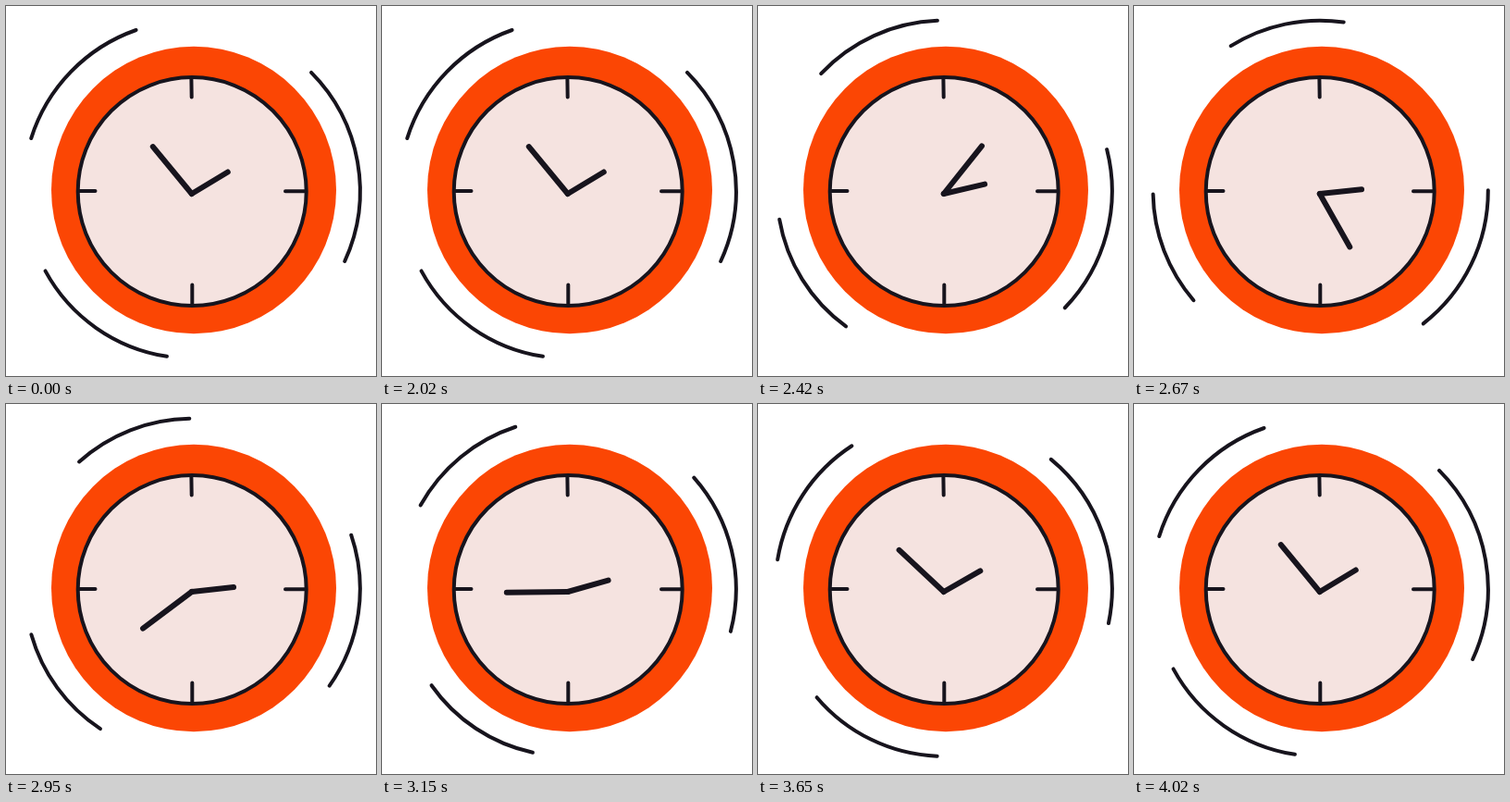
Recreate the animation shown at these times as an HTML page. Size 400 by 400 pixels, loop 4.05 s.

```html
<!DOCTYPE html>
<html lang="en">
<head>
<meta charset="utf-8">
<title>Clock</title>
<style>
html, body { margin: 0; width: 100%; height: 100%; overflow: hidden; background: #fff; }
svg { display: block; width: 100vw; height: 100vh; }
.ink { fill: none; stroke: #17141d; stroke-width: 4; stroke-linecap: round; stroke-linejoin: round; }
.hand { stroke-width: 6; }
</style>
</head>
<body>
<svg viewBox="0 0 400 400">
  <ellipse cx="203" cy="199" rx="154" ry="155.3" fill="#fb4604"/>
  <circle cx="201.2" cy="200.6" r="123.5" fill="#f5e3e0"/>
  <circle class="ink" cx="201.2" cy="200.6" r="123.5"/>
  <path class="ink" d="M200.4 79L200.7 98.5M201.3 301.5V322M79 200H96.5M302 200.2H323"/>
  <path class="ink hand" id="hour" d="M0 0V-45.5"/>
  <path class="ink hand" id="minute" d="M0 0V-66"/>
  <g id="arcs"></g>
</svg>
<script>
const LOOP = 4050, START = 2020, END = 4020, STEP = 25;

// Cubic bezier easing with end heights 0 and 1, solved by bisection.
function bezier(x1, x2) {
  return u => {
    let lo = 0, hi = 1;
    for (let i = 0; i < 30; i++) {
      const s = (lo + hi) / 2, r = 1 - s;
      if (3 * r * r * s * x1 + 3 * r * s * s * x2 + s * s * s < u) lo = s;
      else hi = s;
    }
    return lo * lo * (3 - 2 * lo);
  };
}

const sine = u => (1 - Math.cos(Math.PI * u)) / 2;

// keys: [time, value, easing towards this key]
function track(keys, t) {
  for (let i = 1; i < keys.length; i++) {
    const [t0, v0] = keys[i - 1], [t1, v1, ease = sine] = keys[i];
    if (t <= t1) return v0 + (v1 - v0) * ease((t - t0) / (t1 - t0));
  }
  return keys[keys.length - 1][1];
}

const minuteKeys = [[0, -39.5], [2000, 320.5, bezier(.31, .19)]];
const hourKeys = [[0, 58.9], [790, 84.9, bezier(.31, .4)], [2000, 58.9, bezier(.37, .12)]];
const spanKeys = [[0, 1], [670, .752], [1330, .822], [2000, 1]];
const swing = (t1, peak, t2, dip) => [[0, 0], [t1, peak], [t2, dip], [2000, 0]];

const arcs = [
  { x: 201, y: 198, r: 182.3, mid: 224.1, span: 53.1, keys: swing(690, 34.3, 1475, -13.5) },
  { x: 201, y: 200, r: 181.8, mid: -10.05, span: 69.5, keys: swing(640, 36, 1350, -15) },
  { x: 201.3, y: 200.2, r: 180.7, mid: 125.1, span: 52.8, keys: swing(650, 34, 1370, -14) }
];

const byId = id => document.getElementById(id);
for (const arc of arcs) {
  arc.el = document.createElementNS("http://www.w3.org/2000/svg", "path");
  arc.el.setAttribute("class", "ink");
  byId("arcs").append(arc.el);
}

function arcPath({ x, y, r }, from, to) {
  const point = deg => {
    const a = deg * Math.PI / 180;
    return (x + r * Math.cos(a)).toFixed(2) + " " + (y + r * Math.sin(a)).toFixed(2);
  };
  return `M${point(from)}A${r} ${r} 0 0 1 ${point(to)}`;
}

function turn(id, deg) {
  byId(id).setAttribute("transform", `translate(200.8 203) rotate(${deg})`);
}

function draw(time) {
  const now = time % LOOP;
  const t = now < START || now >= END ? 0 : Math.floor((now - START) / STEP) * STEP;
  turn("hour", track(hourKeys, t));
  turn("minute", track(minuteKeys, t));
  const scale = track(spanKeys, t);
  for (const arc of arcs) {
    const mid = arc.mid + track(arc.keys, t), half = arc.span * scale / 2;
    arc.el.setAttribute("d", arcPath(arc, mid - half, mid + half));
  }
}

const origin = performance.now();
function tick() {
  draw(performance.now() - origin);
  requestAnimationFrame(tick);
}
tick();
</script>
</body>
</html>
```
